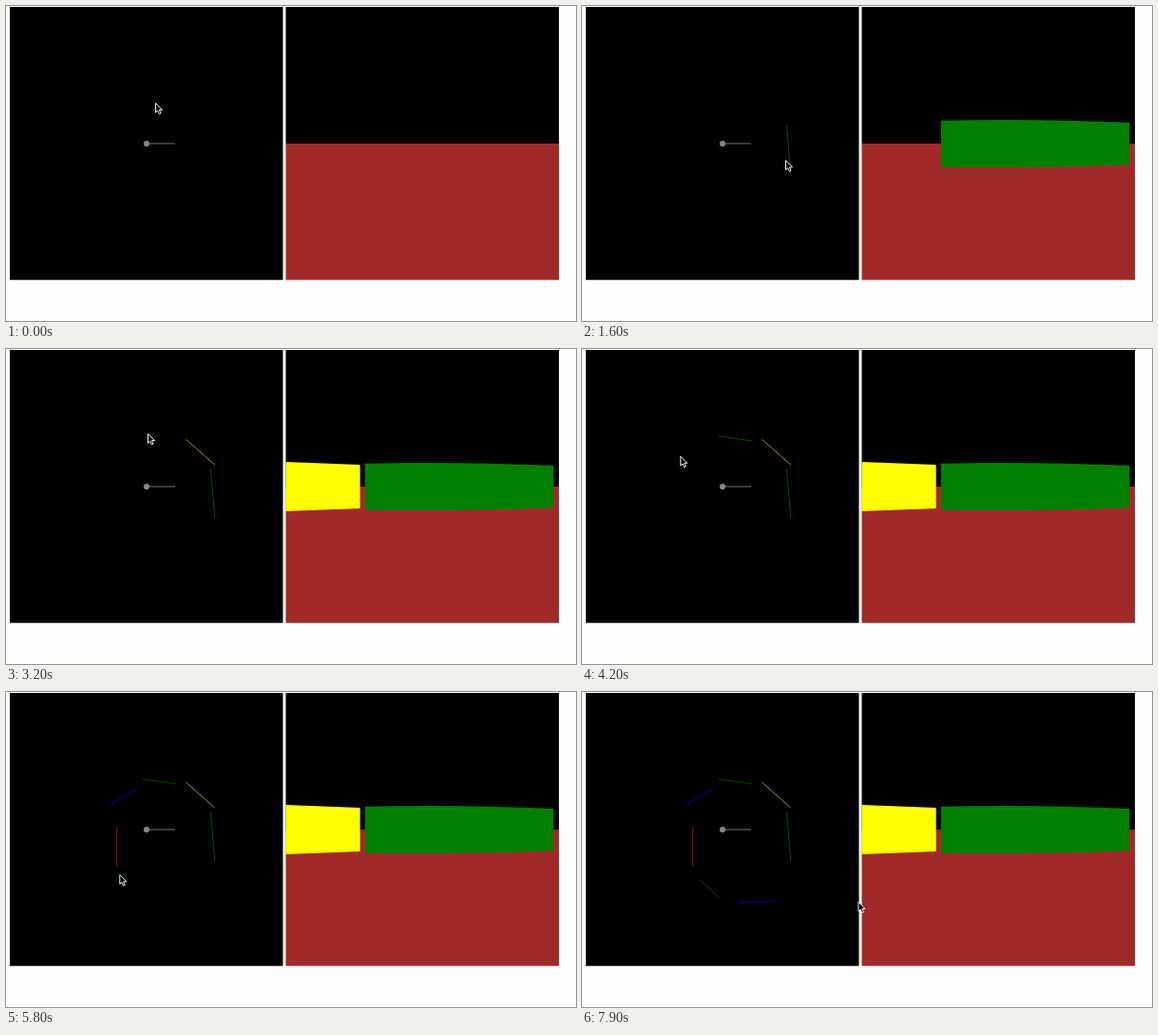
Recreate the animation shown at these times as an HTML page. Size 600 px wide and 332 px high, loop 8 s.

```html
<!DOCTYPE html>
<html lang="en">
<head>
<meta charset="utf-8">
<title>Wall drawing and first-person view</title>
<style>
html, body { margin: 0; width: 100%; height: 100%; overflow: hidden; background: #fefdff; }
svg { display: block; }
</style>
</head>
<body>
<svg width="600" height="332" viewBox="0 0 600 332">
  <rect x="4" y="1" width="287.5" height="287.7"/>
  <rect x="294.5" y="1" width="287.5" height="144.5"/>
  <rect x="294.5" y="145" width="287.5" height="143.7" fill="#a22929"/>
  <path class="view" fill="#008000" d="M378 120.7Q480 118.8 576.3 123V167.2Q480 171 378 169.8Z"/>
  <path class="view" fill="#ff0" d="M294.5 119L372.7 122V168L294.5 171Z"/>
  <g id="plan" fill="none" stroke-width=".9"></g>
  <path d="M148 145H178" stroke="#808080" stroke-width=".9"/>
  <circle cx="148" cy="145" r="3.1" fill="#858585"/>
  <path id="cursor" d="M.5 .3V10.2L2.7 8.2L4.3 11.8L6 11L4.4 7.5H7.5Z" fill="#000" stroke="#fff" stroke-width=".95" stroke-linejoin="round"/>
</svg>
<script>
const LOOP = 8000, STEP = 100;
const HOT_X = 5.7, HOT_Y = 6.2; // click point inside the pointer
const GREEN = '#005600', BLUE = '#0000b8';

// each wall is dragged from one point to another between two steps
const wall = (color, from, x1, y1, to, x2, y2) => ({ color, from, x1, y1, to, x2, y2 });
const walls = [
  wall(GREEN, 9, 215.5, 126, 15, 219.7, 178),
  wall('#b89c1a', 21, 219.7, 122, 25, 189.5, 95.3),
  wall(GREEN, 28, 179, 97, 33, 144, 91.8),
  wall(BLUE, 38, 139, 101.2, 42, 109, 119),
  wall('#a80000', 47, 116.5, 143, 49, 116.5, 184),
  wall(GREEN, 58, 125, 198.5, 59, 144.8, 217.3),
  wall(BLUE, 70, 164, 222.2, 72, 204, 219.7)
];

// the pointer visits both ends of every wall, with a few detours
const stop = (step, x, y) => ({ step, x, y });
const stops = [
  stop(1, 157, 102), stop(3, 205, 126), stop(6, 218, 122),
  stop(31, 149, 89), stop(53, 120, 203), stop(62, 160, 211),
  stop(64, 179, 226), stop(76, 290.5, 221),
  ...walls.flatMap(w => [
    stop(w.from, w.x1 - HOT_X, w.y1 - HOT_Y),
    stop(w.to, w.x2 - HOT_X, w.y2 - HOT_Y)
  ])
].sort((a, b) => a.step - b.step);

// early on the pointer skips two steps in seven
const rests = step => step < 43 && (step % 7 === 1 || step % 7 === 4);

const views = document.querySelectorAll('.view');
const plan = document.getElementById('plan');
const cursor = document.getElementById('cursor');

walls.forEach((w, i) => {
  const line = document.createElementNS('http://www.w3.org/2000/svg', 'path');
  line.setAttribute('d', `M${w.x1} ${w.y1}L${w.x2} ${w.y2}`);
  line.setAttribute('stroke', w.color);
  plan.append(line);
  w.parts = views[i] ? [line, views[i]] : [line];
});

function pointerAt(step) {
  if (rests(step)) step--;
  const i = stops.findIndex(s => s.step >= step);
  if (i < 0) return stops[stops.length - 1];
  if (i === 0) return stops[0];
  const a = stops[i - 1], b = stops[i];
  const k = (step - a.step) / (b.step - a.step);
  return { x: a.x + (b.x - a.x) * k, y: a.y + (b.y - a.y) * k };
}

function draw(t) {
  const step = Math.floor(t / STEP);
  for (const w of walls)
    for (const part of w.parts) part.style.display = step > w.to ? '' : 'none';
  const { x, y } = pointerAt(step);
  cursor.setAttribute('transform', `translate(${x} ${y})`);
}

let start;
function tick(now) {
  start ??= now;
  draw((now - start) % LOOP);
  requestAnimationFrame(tick);
}
draw(0);
requestAnimationFrame(tick);
</script>
</body>
</html>
```
